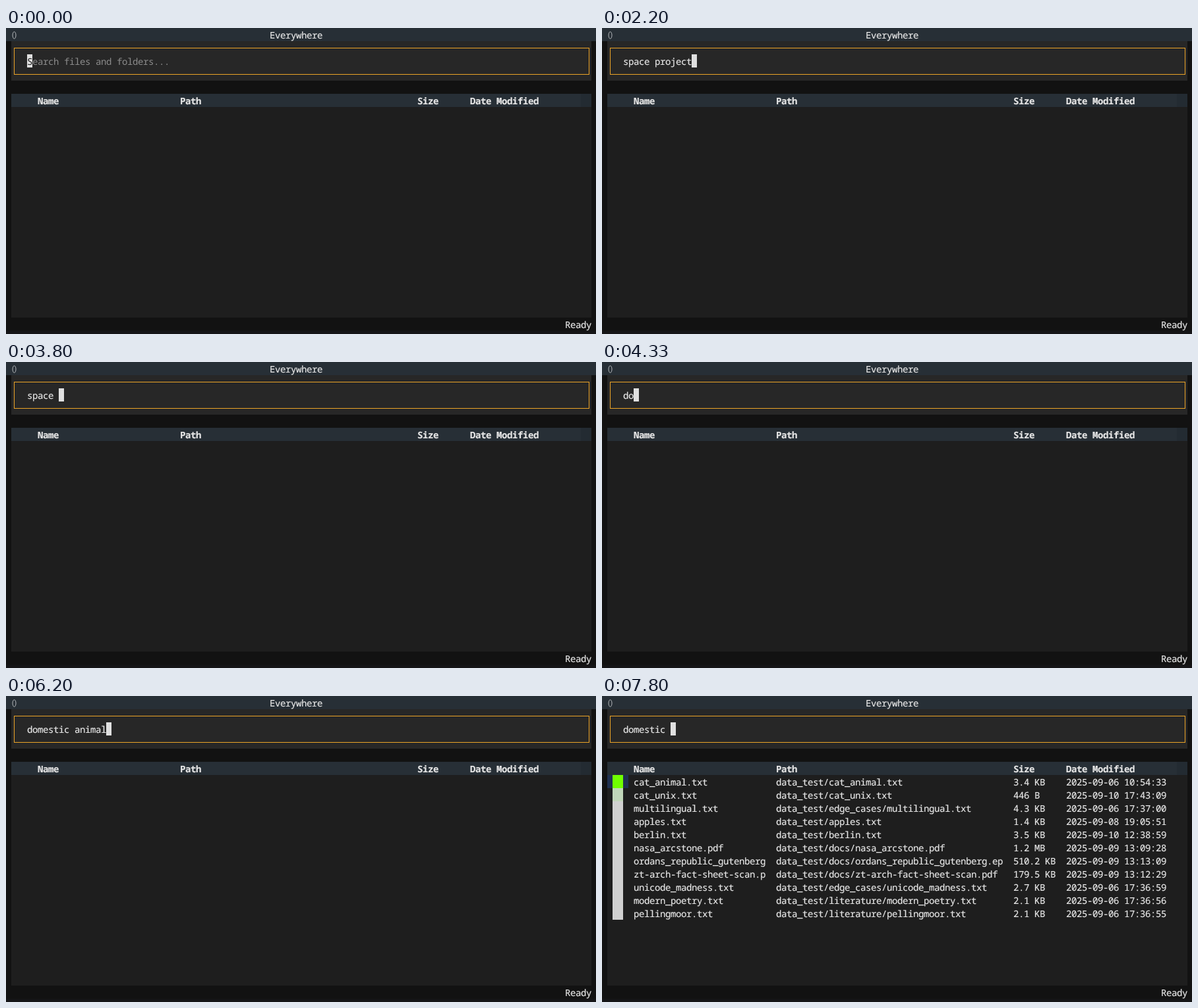
These frames come from a looping animation (895 px wide and 465 px high, 8 s). An HTML page:

```html
<!DOCTYPE html>
<html lang="en">
<head>
<meta charset="utf-8">
<title>Everywhere</title>
<style>
  html, body { margin: 0; width: 100%; height: 100%; overflow: hidden; background: #121212; }
  svg { display: block; }
  text {
    font: 500 14px "Noto Sans Mono", "DejaVu Sans Mono", monospace;
    letter-spacing: -0.4px;
    fill: #e6e6e6;
    stroke: #e6e6e6;
    stroke-width: 0.2px;
    white-space: pre;
    text-rendering: geometricPrecision;
  }
  .head text { font-weight: 700; }
  #hint { fill: #8c8c8c; stroke: none; }
  #hintCap { fill: #1e1e1e; stroke: none; }
</style>
</head>
<body>
<svg width="895" height="465" viewBox="0 0 895 465">
  <rect width="895" height="465" fill="#121212"/>
  <rect y="460" width="895" height="5" fill="#151517"/>
  <rect width="895" height="20" fill="#272f36"/>
  <ellipse cx="12.5" cy="11" rx="2.5" ry="5.3" fill="none" stroke="#b4b8bb"/>
  <text x="400" y="16">Everywhere</text>

  <rect x="8" y="20" width="880" height="60" fill="#272727"/>
  <rect x="12.5" y="30.5" width="872" height="40" fill="none" stroke="#eca427"/>
  <text id="hint" x="32" y="56">Search files and folders...</text>
  <text id="query" x="32" y="56"></text>
  <rect id="cursor" y="40" width="8" height="20" fill="#e0e0e0"/>
  <text id="hintCap" x="32" y="56">S</text>

  <rect x="8" y="100" width="880" height="340" fill="#1e1e1e"/>
  <rect x="8" y="100" width="880" height="20" fill="#232b32"/>
  <rect x="8" y="100" width="864" height="20" fill="#272f36"/>
  <g class="head">
    <text x="48" y="116">Name</text>
    <text x="264" y="116">Path</text>
    <text x="624" y="116">Size</text>
    <text x="704" y="116">Date Modified</text>
  </g>
  <g id="tables"></g>
  <text x="848" y="456">Ready</text>
</svg>
<script>
const LOOP = 8000;
const byId = id => document.getElementById(id);

// folder, file, size, modified in September 2025
const files = {
  stone: ["docs/", "nasa_arcstone.pdf", "1.2 MB", "09 13:09:28"],
  berlin: ["", "berlin.txt", "3.5 KB", "10 12:38:59"],
  sheet: ["docs/", "zt-arch-fact-sheet-scan.pdf", "179.5 KB", "09 13:12:29"],
  unicode: ["edge_cases/", "unicode_madness.txt", "2.7 KB", "06 17:36:59"],
  unix: ["", "cat_unix.txt", "446 B", "10 17:43:09"],
  apples: ["", "apples.txt", "1.4 KB", "08 19:05:51"],
  animal: ["", "cat_animal.txt", "3.4 KB", "06 10:54:33"],
  republic: ["docs/", "ordans_republic_gutenberg.epub", "510.2 KB", "09 13:13:09"],
  lingual: ["edge_cases/", "multilingual.txt", "4.3 KB", "06 17:37:00"],
  poetry: ["literature/", "modern_poetry.txt", "2.1 KB", "06 17:36:56"],
  plays: ["literature/", "pellingmoor.txt", "2.1 KB", "06 17:36:55"],
  calculus: ["science/", "calculus_notes.txt", "1.3 KB", "06 17:36:51"],
  quantum: ["science/", "quantum_physics.txt", "1.3 KB", "06 17:36:50"]
};

const results = {
  space: {
    rows: "stone berlin sheet unicode unix apples animal republic lingual poetry plays calculus quantum",
    bars: ["#70ff00", "#9fe08a", "#b0d9a4", "#b5d9ad", "#cccfca"]
  },
  brief: {
    rows: "unix animal apples lingual berlin unicode stone republic sheet",
    bars: ["#70ff00", "#bfd6b8"]
  },
  pets: {
    rows: "animal unix lingual apples berlin stone republic sheet unicode poetry plays",
    bars: ["#70ff00", "#c0d6b9"]
  }
};

// Each entry: time, phrase, number of typed characters
const SPACE = "space project", PETS = "domestic animal";
const typing = [
  [0, "", 0], [930, SPACE, 2], [1070, SPACE, 3], [1130, SPACE, 4], [1270, SPACE, 5],
  [1330, SPACE, 6], [1470, SPACE, 7], [1600, SPACE, 8], [1670, SPACE, 9],
  [1800, SPACE, 10], [1870, SPACE, 11], [2070, SPACE, 12], [2200, SPACE, 13],
  [3530, SPACE, 6], [3870, "", 0],
  [4270, PETS, 1], [4330, PETS, 2], [4600, PETS, 3], [4870, PETS, 4], [4930, PETS, 5],
  [5070, PETS, 6], [5270, PETS, 7], [5400, PETS, 9], [5600, PETS, 10],
  [5800, PETS, 12], [5930, PETS, 13], [6130, PETS, 14], [6200, PETS, 15], [7800, PETS, 9]
];
const listing = [
  [0, ""], [2470, "space"], [3800, ""], [4730, "brief"], [4870, ""], [6470, "pets"]
];
const blinks = [[0, true], [3070, false], [3530, true], [6930, false], [7470, true]];

function add(parent, tag, attrs, content = "") {
  const node = document.createElementNS("http://www.w3.org/2000/svg", tag);
  for (const key in attrs) node.setAttribute(key, attrs[key]);
  node.textContent = content;
  return parent.appendChild(node);
}

function buildTable({ rows, bars }) {
  const group = add(byId("tables"), "g", {});
  add(group, "rect", { x: 8, y: 120, width: 32, height: 20, fill: "#1f3051" });
  rows.split(" ").forEach((key, i) => {
    const [folder, name, size, date] = files[key];
    const top = 120 + i * 20;
    const cell = (x, content) => add(group, "text", { x, y: top + 16 }, content);
    add(group, "rect", { x: 16, y: top, width: 16, height: 20, fill: bars[i] || "#d0d0d0" });
    cell(48, name.slice(0, 25));
    cell(264, ("data_test/" + folder + name).slice(0, 43));
    cell(624, size);
    cell(704, "2025-09-" + date);
  });
  return group;
}

const tables = {};
for (const key in results) tables[key] = buildTable(results[key]);

const latest = (track, t) => track.filter(step => step[0] <= t).pop();
const show = (node, on) => node.setAttribute("visibility", on ? "visible" : "hidden");

function draw(t) {
  const [, phrase, count] = latest(typing, t);
  const cursorOn = latest(blinks, t)[1];
  byId("query").textContent = phrase.slice(0, count);
  byId("cursor").setAttribute("x", 32 + count * 8);
  show(byId("cursor"), cursorOn);
  show(byId("hint"), !count);
  show(byId("hintCap"), !count && cursorOn);
  const current = latest(listing, t)[1];
  for (const key in tables) show(tables[key], key === current);
}

const start = performance.now();
function tick() {
  draw((performance.now() - start) % LOOP);
  requestAnimationFrame(tick);
}
tick();
</script>
</body>
</html>
```
